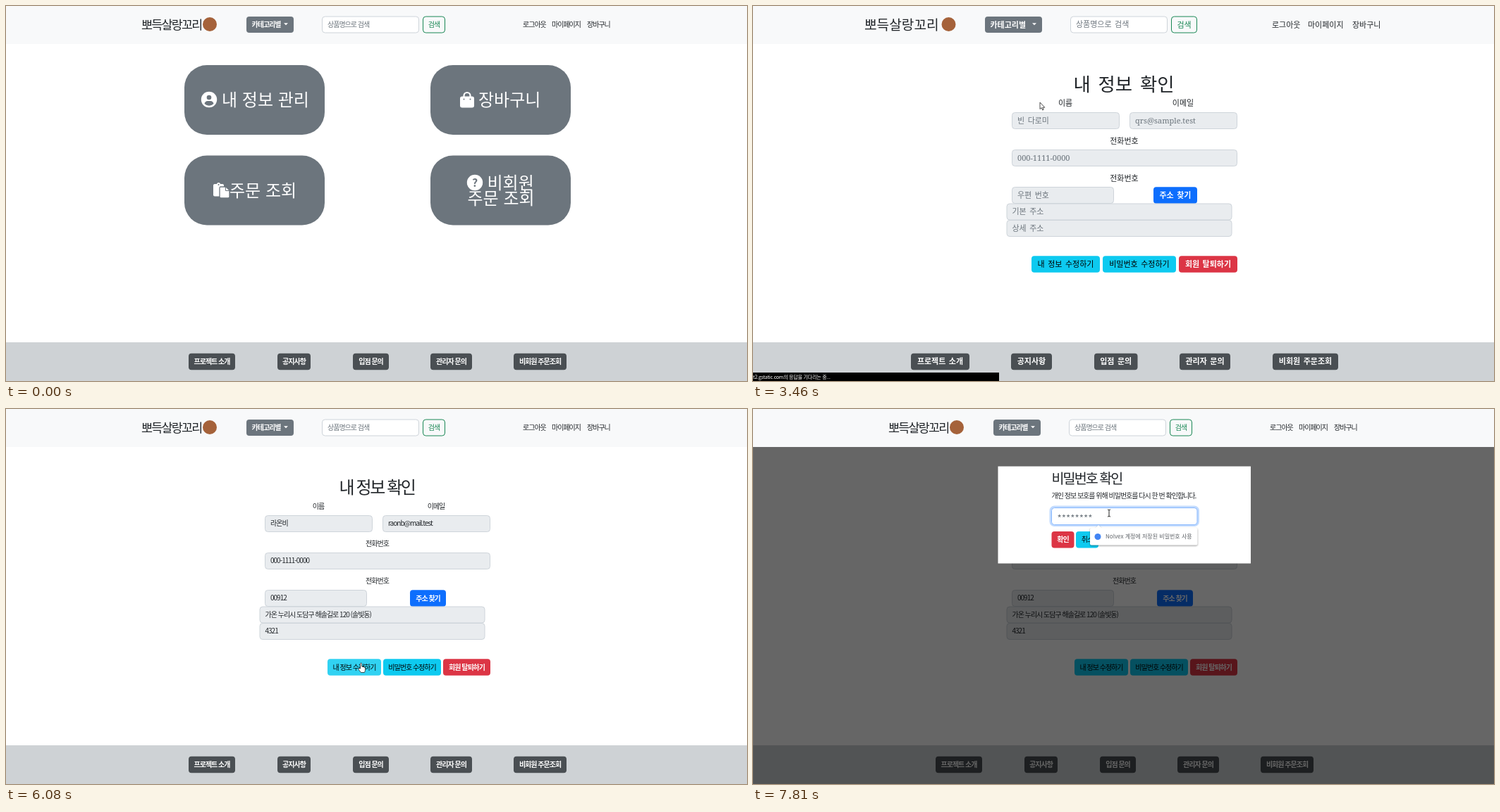
These frames come from a looping animation (1051x533 px, 8000 ms). An HTML page:

```html
<!DOCTYPE html>
<html lang="ko">
<head>
<meta charset="utf-8">
<style>
  html, body { margin: 0; width: 100%; height: 100%; overflow: hidden; background: #fff; }
  svg { display: block; }
  text { white-space: pre; }
  .hand, .plain { font-family: "Noto Sans CJK KR", "Noto Sans CJK", sans-serif; font-size: 10px; }
  .serif { font-family: "Noto Serif", "Noto Sans CJK KR", "Noto Sans CJK", serif; font-size: 11px; }
  .hand text { letter-spacing: -.1em; }
  .serif text { word-spacing: .15em; }
  .plain text { letter-spacing: 0; }
  .tight text { letter-spacing: -.03em; }
</style>
</head>
<body>
<svg id="stage" width="1051" height="533" viewBox="0 0 1051 533"></svg>
<script>
const INK = '#212529', GRAY = '#6c757d', CYAN = '#0dcaf0', RED = '#dc3545', LINE = '#ced4da';

// Sizes are relative to the font size of the surrounding group (10 = 1em); y is the visual centre.
const text = (x, y, label, { size = 10, fill = INK, weight = 500, anchor = 'start' } = {}) =>
  `<text x="${x}" y="${y}" dy=".37em" font-size="${size / 10}em" fill="${fill}" font-weight="${weight}" text-anchor="${anchor}">${label}</text>`;
const centred = (x, y, label, options) => text(x, y, label, { anchor: 'middle', ...options });
const rect = (x, y, w, h, fill, rx = 4, extra = '') =>
  `<rect x="${x}" y="${y}" width="${w}" height="${h}" rx="${rx}" fill="${fill}" ${extra}/>`;
const circle = (x, y, r, fill) => `<circle cx="${x}" cy="${y}" r="${r}" fill="${fill}"/>`;
const path = (d, fill, extra = '') => `<path d="${d}" fill="${fill}" ${extra}/>`;
const group = (id, cls, content) => `<g id="${id}" class="${cls}">${content}</g>`;
const button = ([x, w], y, fill, label, ink = '#fff', extra = '') =>
  rect(x, y, w, 23.5, fill, 4, extra) +
  centred(x + w / 2, y + 11.5, label, { fill: ink, weight: ink === '#fff' ? 700 : 500 });
const field = (x, y, w, value, ink = INK, fill = '#e9ecef') =>
  rect(x + .5, y + .5, w - 1, 23, fill, 4, `stroke="${LINE}"`) + text(x + 8, y + 11.5, value, { fill: ink });

const handLayout = {
  cls: 'hand', logo: 192, mark: 289, menu: [341, 67], search: 448, find: [591, 32], nav: [733, 774, 824],
  foot: [[259, 66], [385, 47], [492, 51], [602, 59], [720, 75]],
  address: [573, 51], actions: [[456, 76], [535, 82], [620, 67]]
};
const serifLayout = {
  cls: 'serif', logo: 158, mark: 277.5, menu: [329, 81], search: 450, find: [593, 37], nav: [736, 787, 850],
  foot: [[224, 83], [366, 58], [484, 61.5], [605, 72], [737, 93]],
  address: [568, 62], actions: [[395, 97], [496, 104], [604, 83]]
};

function chrome(l) {
  const [menuX, menuW] = l.menu, [findX, findW] = l.find, caret = menuX + menuW - 14;
  return rect(0, 0, 1051, 54, '#f8f9fa', 0) +
    text(l.logo, 27, '뽀득살랑꼬리', { size: 17.4 }) + circle(l.mark, 26, 10, '#a5623a') +
    rect(menuX, 15, menuW, 23, GRAY) + text(menuX + 7.5, 26.5, '카테고리별', { fill: '#fff', weight: 700 }) +
    path(`M${caret} 24.3h6l-3 3z`, '#fff') +
    field(l.search, 14.5, 138, '상품명으로 검색', GRAY, '#fff') +
    rect(findX + .5, 15, findW - 1, 23, 'none', 4, 'stroke="#198754"') +
    centred(findX + findW / 2, 26.5, '검색', { fill: '#198754' }) +
    ['로그아웃', '마이페이지', '장바구니'].map((s, i) => text(l.nav[i], 26.5, s)).join('') +
    rect(0, 478, 1051, 55, '#ced2d5', 0) +
    ['프로젝트 소개', '공지사항', '입점 문의', '관리자 문의', '비회원 주문조회']
      .map((s, i) => button(l.foot[i], 493.7, '#4a4f53', s)).join('');
}

function home() {
  const big = (id, x, y) => rect(x, y, 199, 99, GRAY, 32, `id="${id}"`);
  const label = (x, y, s) => text(x, y, s, { size: 24, fill: '#fff' });
  const person = circle(288, 133, 11.2, '#fff') + circle(288, 130, 3.3, GRAY) +
    path('M281.5 139q1-4 4.500-4h4q3.500 0 4.500 4q-6.500 5.500-13 0z', GRAY);
  const bag = rect(644, 128.5, 20, 16, '#fff', 3) +
    path('M649.500 131v-3.500a4.500 4.500 0 0 1 9 0v3.500', 'none', 'stroke="#fff" stroke-width="2.2"') +
    circle(649.5, 132.5, 1, GRAY) + circle(658.5, 132.5, 1, GRAY);
  const paste = rect(294, 253, 15, 17.5, '#fff', 2) + circle(301.5, 253.5, 2.5, '#fff') + circle(301.5, 254, 1, GRAY) +
    path('M304 257h8l5 5v9q0 2-2 2h-10q-2 0-2-2v-12q0-2 1-2z', '#fff', `stroke="${GRAY}" stroke-width="1.300"`) +
    path('M311.500 257v5.500h5.500', 'none', `stroke="${GRAY}"`);
  const question = circle(665, 251, 11.2, '#fff') + centred(665, 251, '?', { size: 16, fill: GRAY, weight: 700 });
  return chrome(handLayout) + big('info', 253, 84) + big('cart', 602, 84) + big('orders', 253, 212.5) + big('guest', 602, 212.5) +
    group('tiles', 'plain', person + label(306, 133, '내 정보 관리') + bag + label(670, 133, '장바구니') +
      paste + label(317, 262, '주문 조회') + question + label(682.5, 251, '비회원') + label(654.5, 273, '주문 조회'));
}

function form(l, [name, mail, phone, zip, street, detail], ink, id = '') {
  const [edit, password, leave] = l.actions;
  return chrome(l) + centred(526, 111, '내 정보 확인', { size: 24 }) +
    centred(443, 138, '이름') + centred(610, 138, '이메일') +
    centred(526.5, 191.5, '전화번호') + centred(526.5, 244.5, '전화번호') +
    field(367, 151, 153, name, ink) + field(534, 151, 153, mail, ink) + field(367, 204, 320, phone, ink) +
    field(367, 257, 145, zip, ink) + button(l.address, 257.3, '#0d6efd', '주소 찾기') +
    field(359.5, 280.5, 320, street, ink) + field(359.5, 304, 320, detail, ink) +
    button(edit, 355.3, CYAN, '내 정보 수정하기', '#000', id && `id="${id}"`) +
    button(password, 355.3, CYAN, '비밀번호 수정하기', '#000') + button(leave, 355.3, RED, '회원 탈퇴하기');
}

const dialog = rect(0, 54, 1051, 479, '#000', 0, 'opacity=".6"') + rect(347.5, 81.5, 358.5, 138, '#fff', 0) +
  text(423.5, 98.5, '비밀번호 확인', { size: 19.6 }) +
  text(423.5, 123, '개인 정보 보호를 위해 비밀번호를 다시 한 번 확인합니다.') +
  rect(422, 139, 209.5, 26.5, 'none', 5.5, 'id="ring" stroke="#c2dbfe" stroke-width="3"') +
  rect(423.5, 140.5, 206.5, 24, '#fff', 4, `id="input" stroke="${LINE}"`) +
  `<g class="plain">${text(431.5, 155, '********', { size: 13.4, fill: GRAY, weight: 400 })}</g>` +
  rect(432, 147, 1, 10, '#000', 0, 'id="caret"') +
  button([423.5, 32], 174, RED, '확인') + button([458, 32], 174, CYAN, '취소', '#000') +
  group('hint', 'plain',
    `<g style="filter:drop-shadow(0 1px 1px #0006)">${rect(478, 169, 152.5, 24.5, '#fff', 2)}${path('M486 169l4-4 4 4z', '#fff')}</g>` +
    circle(489, 181.5, 4.5, '#4285f4') +
    text(500, 181.5, 'Nolvex 계정에 저장된 비밀번호 사용', { size: 8, fill: '#5f6368', weight: 400 }));

const outline = 'stroke="#222" stroke-width=".8" stroke-linejoin="round"';
const cursors =
  group('arrow', '', path('M0 0V9.500L2.200 7.600 3.700 11 5.200 10.300 3.800 7.200H6.800Z', '#fff', outline)) +
  group('pointer', '', `<g transform="translate(-4)">` +
    path('M3 8V1.200a1.100 1.100 0 0 1 2.200 0V5l3.600.9q1.200.3 1.200 1.600V10q0 2-1.200 3.500H4L.6 9.300Q0 8 1.200 7.600Z', '#fff', outline) + '</g>') +
  group('beam', '', path('M-2-5q2 0 2 1q0-1 2-1M0-4V4M-2 5q2 0 2-1q0 1 2 1', 'none', 'stroke="#222"'));

const samples = ['빈 다로미', 'qrs@sample.test', '000-1111-0000', '우편 번호', '기본 주소', '상세 주소'];
const values = ['라온비', 'raonb@mail.test', '000-1111-0000', '00912', '가온 누리시 도담구 해솔길로 120 (솔빛동)', '4321'];
document.getElementById('stage').innerHTML =
  group('home', 'hand', home()) +
  group('unstyled', 'serif', form(serifLayout, samples, GRAY)) +
  group('empty', 'hand', form(handLayout, samples, GRAY)) +
  group('filled', 'hand', form(handLayout, values, INK, 'edit')) +
  group('dialog', 'hand', dialog) +
  group('status', 'plain tight', rect(0, 521, 349, 12, '#000', 0) +
    text(0, 527, 't2.gstatic.com의 응답을 기다리는 중...', { size: 7, fill: '#fff', weight: 400 })) +
  group('cursor', '', cursors);

const el = id => document.getElementById(id);
const show = (id, on) => { el(id).style.display = on ? '' : 'none'; };
const ramp = (t, start, length = 150) => Math.max(0, Math.min(1, (t - start) / length));
const mix = (id, over, base, amount) => { el(id).style.fill = `color-mix(in srgb, ${over} ${amount * 100}%, ${base})`; };

// time, x, y of the mouse
const mouse = [
  [320, 918, 405], [920, 466, 139], [1190, 466, 139], [1460, 407, 137], [3790, 407, 137], [4540, 491, 359],
  [4610, 500, 360], [4680, 511, 360], [4750, 500, 360], [5010, 500, 360], [5060, 502.5, 360], [6010, 502.5, 360],
  [6080, 503.5, 361], [6410, 503, 361], [6450, 503, 361], [7210, 505, 148]
];
function mouseAt(t) {
  const next = mouse.findIndex(k => k[0] > t);
  if (next < 0) return mouse[mouse.length - 1].slice(1);
  const [t0, x0, y0] = mouse[Math.max(0, next - 1)], [t1, x1, y1] = mouse[next];
  const p = ramp(t, t0, t1 - t0 || 1), eased = p * p * (3 - 2 * p);
  return [x0 + (x1 - x0) * eased, y0 + (y1 - y0) * eased];
}

function draw(t) {
  const [x, y] = mouseAt(t);
  const over = (left, top, w, h) => x >= left && x <= left + w && y >= top && y <= top + h;
  const open = t >= 6410;

  show('home', t < 3460);
  show('unstyled', t >= 3460 && t < 3520);
  show('empty', t >= 3520 && t < 3590);
  show('filled', t >= 3590);
  show('dialog', open);
  show('status', t >= 1600 && t < 3860);

  mix('guest', '#5c636a', GRAY, ramp(t, 540) - ramp(t, 705));
  mix('info', '#5c636a', GRAY, ramp(t, 1270));
  mix('edit', '#31d2f2', CYAN, ramp(t, 4380) - ramp(t, 6450));

  const focus = ramp(t, 7260);
  el('ring').style.opacity = focus;
  mix('input', '#fff', '#fff', 1);
  el('input').style.stroke = focus ? '#86b7fe' : LINE;
  show('caret', t >= 7280 && t < 7810);
  show('hint', t >= 7340);

  const link = t < 2400 ? over(253, 84, 199, 99) || over(602, 212, 199, 99)
    : t >= 3590 && !open && over(456, 355, 76, 24);
  const beam = open && over(423, 140, 207, 24);
  show('cursor', t >= 320);
  show('pointer', link);
  show('beam', beam);
  show('arrow', !link && !beam);
  el('cursor').setAttribute('transform', `translate(${x} ${y})`);
}

const start = performance.now();
function tick() {
  draw((performance.now() - start) % 8000);
  requestAnimationFrame(tick);
}
tick();
</script>
</body>
</html>
```
